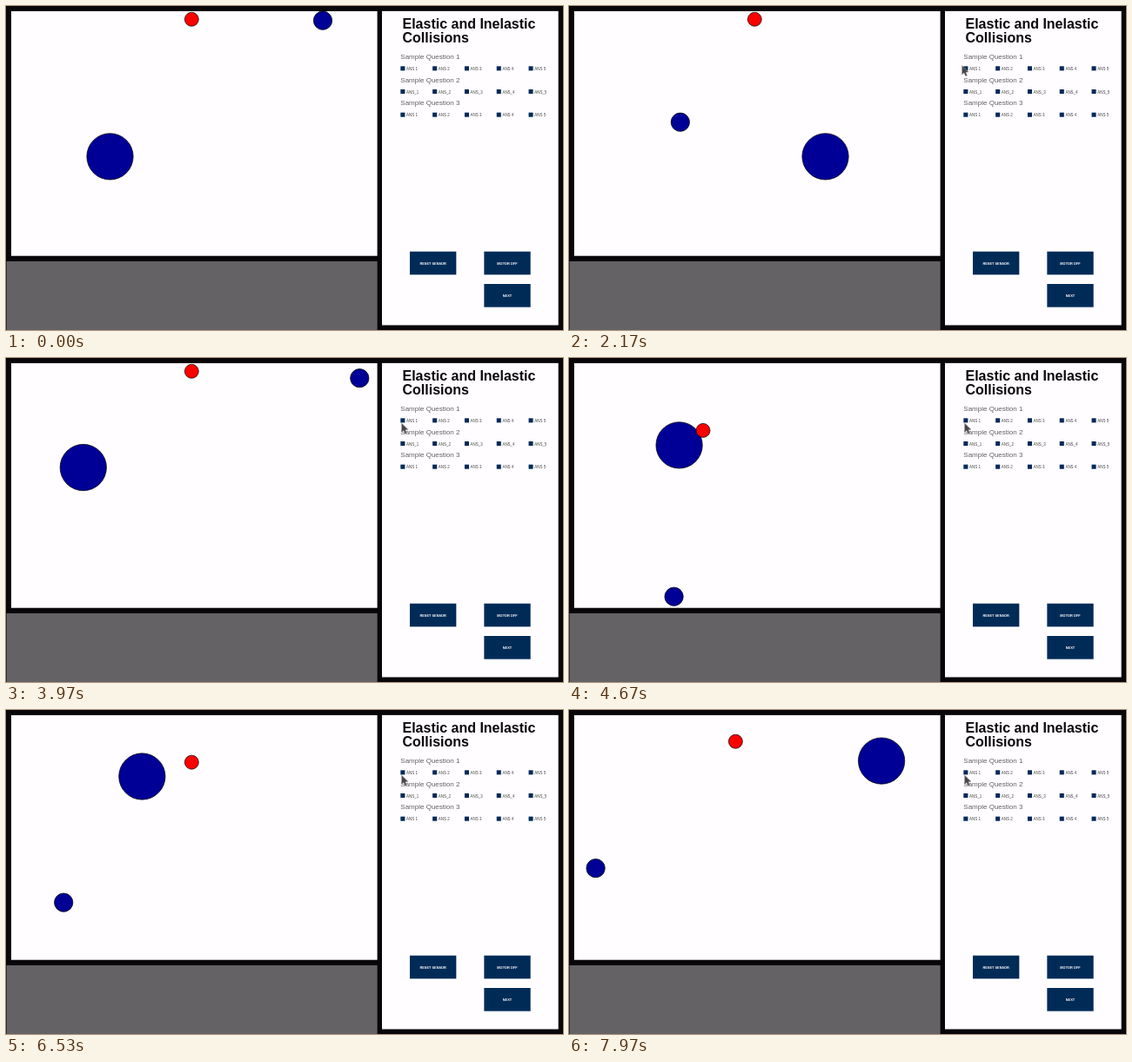
These frames come from a looping animation (640x373 px, 8 s). An HTML page with a canvas:

```html
<!DOCTYPE html>
<html lang="en">
<head>
<meta charset="utf-8">
<title>Elastic and Inelastic Collisions</title>
<style>
  html, body { margin: 0; width: 100%; height: 100%; overflow: hidden; background: #080608; }
  canvas { display: block; width: 640px; height: 373px; }
</style>
</head>
<body>
<canvas id="stage" width="640" height="373"></canvas>
<script>
const ctx = document.getElementById('stage').getContext('2d');
const LOOP = 8000;
const UNIT = 8 / 15; // the layout is designed 1200 units wide
const ARENA = { left: 6, right: 427, top: 6, bottom: 288 };
const NAVY = '#002b57', BLUE = '#000096', RED = '#fa0000', WHITE = '#fffdff', BLACK = '#080608';
const SANS = '"Liberation Sans", Arial, sans-serif';

// Each kick sets a new velocity: [seconds, vx, vy] in pixels per second.
const balls = [
  {
    x: 364, y: 16.7, radius: 20 * UNIT, color: BLUE,
    kicks: [[0.02, -110, 54.5], [3.04, -436.8, 377.9], [5.08, 189.9, 213.9],
            [5.38, -91.6, 305.8], [6.21, -24.8, 336.2]]
  },
  {
    x: 119.5, y: 173.3, radius: 50 * UNIT, color: BLUE,
    kicks: [[0.02, -261, 0], [3.04, -97.2, -51], [4.4, -16.1, -13.3],
            [5.37, -169, -12.5], [6.21, 199, -12.5]]
  },
  {
    x: 213.3, y: 15.3, radius: 15 * UNIT, color: RED,
    kicks: [[4, -145, 162], [4.4, -4.7, 12.4], [5.37, 54, -27.5], [6.53, -15.3, -16.7]]
  }
];

// Reflects a coordinate between two walls.
function bounce(p, low, high) {
  const span = high - low;
  const phase = (((p - low) % (2 * span)) + 2 * span) % (2 * span);
  return low + (phase < span ? phase : 2 * span - phase);
}

function position({ x, y, radius, kicks }, seconds) {
  kicks.forEach(([start, vx, vy], i) => {
    const end = i + 1 < kicks.length ? kicks[i + 1][0] : Infinity;
    const flight = Math.max(0, Math.min(seconds, end) - start);
    x = bounce(x + vx * flight, ARENA.left + radius, ARENA.right - radius);
    y = bounce(y + vy * flight, ARENA.top + radius, ARENA.bottom - radius);
  });
  return [x, y];
}

function drawBall(ball, seconds) {
  ctx.beginPath();
  ctx.arc(...position(ball, seconds), ball.radius, 0, 2 * Math.PI);
  ctx.fillStyle = ball.color;
  ctx.fill();
  ctx.strokeStyle = '#000';
  ctx.lineWidth = 0.7;
  ctx.stroke();
}

function box(color, x, y, w, h) {
  ctx.fillStyle = color;
  ctx.fillRect(x, y, w, h);
}

function label(text, x, y, font, color, align = 'left') {
  ctx.font = `${font} ${SANS}`;
  ctx.fillStyle = color;
  ctx.textAlign = align;
  ctx.fillText(text, x, y);
}

function button(text, x, y) {
  box(NAVY, x, y, 100, 50);
  label(text, x + 50, y + 28, 'bold 7.3px', '#fff', 'center');
}

function drawLayout() {
  ctx.save();
  ctx.scale(UNIT, UNIT);
  box(WHITE, 810, 11, 380, 678);
  box('#656265', 1, 551, 799, 149);
  label('Elastic and Inelastic', 854, 49, 'bold 30px', '#0a080a');
  label('Collisions', 854, 79, 'bold 30px', '#0a080a');
  for (let row = 0; row < 3; row++) {
    const y = 130 + row * 50;
    label(`Sample Question ${row + 1}`, 850, y - 15.5, '15px', '#625f62');
    for (let col = 0; col < 5; col++) {
      const x = 850 + col * 69;
      box(NAVY, x, y, 9.5, 9.5);
      label(`ANS${row === 1 ? '_' : ' '}${col + 1}`, x + 12.5, y + 8.5, '8.4px', '#444');
    }
  }
  button('RESET SENSOR', 870, 530);
  button('MOTOR OFF', 1030, 530);
  button('NEXT', 1030, 600);
  ctx.restore();
}

function smoothstep(from, to, t) {
  const u = Math.max(0, Math.min(1, (t - from) / (to - from)));
  return u * u * (3 - 2 * u);
}

function drawCursor(seconds) {
  const arrive = smoothstep(1.45, 1.95, seconds), settle = smoothstep(2.2, 2.45, seconds);
  if (!arrive) return;
  ctx.save();
  ctx.translate(640 - 188.5 * arrive + 3 * settle, 95 - 26.5 * arrive + 6.5 * settle);
  const arrow = new Path2D('M0 0V10.5L2.4 8.4L4.2 12.3L6 11.5L4.4 7.7L7.6 7.4Z');
  ctx.fillStyle = '#48464a';
  ctx.fill(arrow);
  ctx.strokeStyle = '#aaa8aa';
  ctx.lineWidth = 0.5;
  ctx.stroke(arrow);
  ctx.restore();
}

function draw(seconds) {
  box(BLACK, 0, 0, 640, 373);
  box(WHITE, ARENA.left, ARENA.top, ARENA.right - ARENA.left - 0.4, ARENA.bottom - ARENA.top - 0.3);
  drawLayout();
  balls.forEach(ball => drawBall(ball, seconds));
  drawCursor(seconds);
}

// The picture advances 30 times a second.
function tick() {
  const t = performance.now() % LOOP;
  draw(Math.floor((t + 7) * 0.03) % 240 / 30);
  requestAnimationFrame(tick);
}
tick();
</script>
</body>
</html>
```
